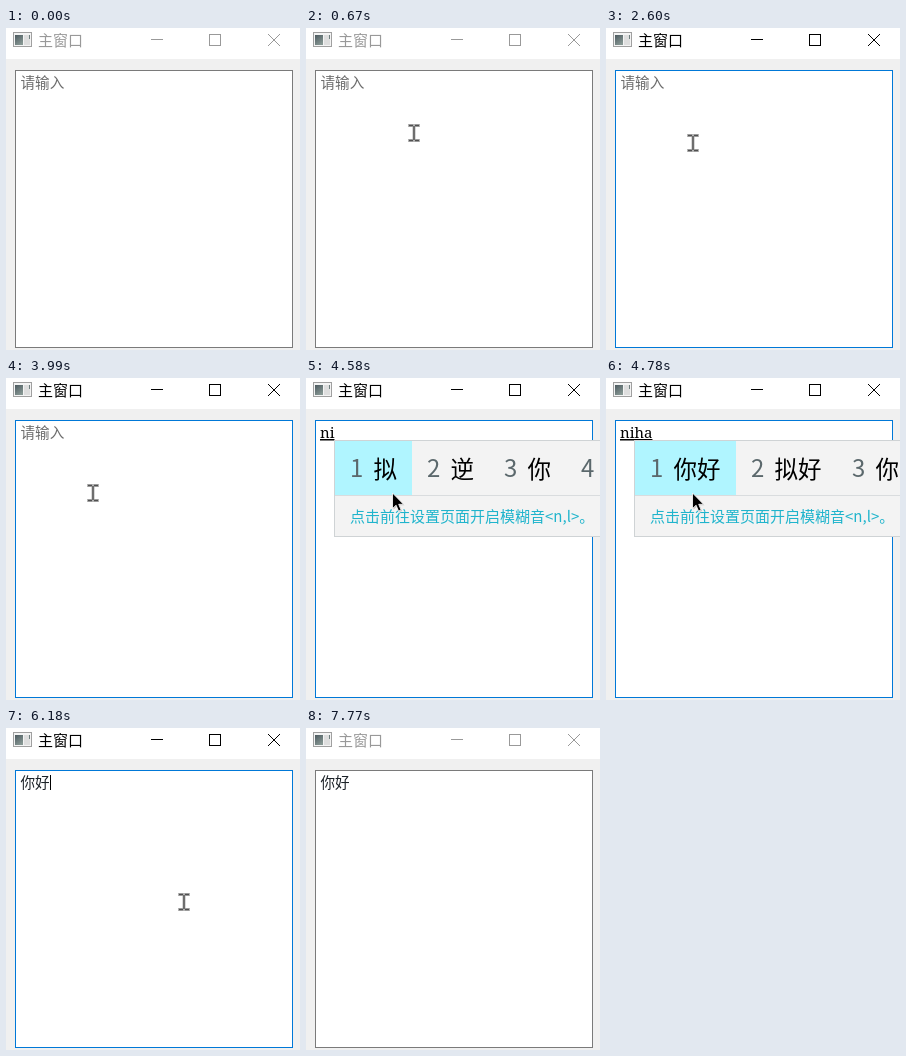
An HTML page for the animation above (7840 ms loop, 294 by 322 pixels).

```html
<!DOCTYPE html>
<html lang="zh-CN">
<head>
<meta charset="utf-8">
<title>主窗口</title>
<style>
  html, body { margin: 0; width: 100%; height: 100%; overflow: hidden; background: #f0f0f0; }
  svg { display: block; width: 294px; height: 322px; }
  text { font-family: "Noto Sans CJK SC", "Noto Sans CJK", sans-serif; font-size: 15px; white-space: pre; }
  .edit { font-size: 14.6px; font-weight: 300; }
  .preedit { font-family: "Noto Serif", serif; text-decoration: underline; }
  .digit { font-size: 24px; fill: #5b686c; }
  .cand { font-size: 23.5px; }
  .hint { fill: #1fb4cc; }
  .crisp { fill: none; shape-rendering: crispEdges; }
</style>
</head>
<body>
<svg viewBox="0 0 294 322">
  <defs>
    <linearGradient id="iconFill" x2="0.6" y2="1">
      <stop offset="0" stop-color="#4c5a60"/>
      <stop offset="1" stop-color="#869692"/>
    </linearGradient>
  </defs>
  <rect width="294" height="322" fill="#f0f0f0"/>
  <rect width="294" height="31" fill="#fff"/>

  <g class="crisp">
    <rect x="7.5" y="4.5" width="18" height="14" style="fill:#f4f4f4" stroke="#a0a0a0"/>
    <rect x="9" y="7" width="8" height="10" style="fill:url(#iconFill)"/>
    <rect x="18" y="7" width="6" height="10" style="fill:#dedede"/>
    <path d="M23.5 7v4" stroke="#6f7f80"/>
  </g>

  <text id="title" x="32" y="18">主窗口</text>
  <g id="buttons" class="crisp">
    <path d="M145 11.5h12M203.5 6.5h11v11h-11z"/>
    <path d="M262 6l12 12M274 6l-12 12"/>
  </g>

  <rect id="box" class="crisp" x="9.5" y="42.5" width="277" height="277" style="fill:#fff"/>
  <text id="edit" class="edit" x="14.5" y="60"></text>
  <text id="preedit" class="preedit" x="14" y="60"></text>
  <rect id="caret" y="47" width="1" height="15"/>

  <g id="popup">
    <rect class="crisp" x="28.5" y="62.5" width="280" height="96" style="fill:#f3f3f3" stroke="#cfd3d5"/>
    <path class="crisp" d="M29 117.5H294" stroke="#d9dcde"/>
    <rect id="highlight" x="29" y="63" height="54" fill="#b0f5ff"/>
    <g id="cands"></g>
    <text class="hint" x="44" y="144">点击前往设置页面开启模糊音&lt;n,l&gt;。</text>
  </g>

  <g id="beam" fill="none">
    <path d="M-6 -7.5H6M-6 7.5H6M0 -8V8" stroke="#b4b4b4" stroke-width="3"/>
    <path d="M-5 -7.5H-1M1 -7.5H5M-5 7.5H-1M1 7.5H5M0 -7V7" stroke="#505050" stroke-width="1.4"/>
  </g>
  <g id="arrow">
    <path d="M1 1V16.5L4.600 13.200L7 19L9.600 18L7.200 12.300H12Z" fill="#000" opacity=".2"/>
    <path d="M0 0V15.500L3.600 12.200L6 18L8.600 17L6.200 11.300H11Z" stroke="#fff" stroke-width=".8"/>
  </g>
</svg>
<script>
const LOOP = 7840, STEP = 66, BLINK = 530, KEY_GAP = 130;
const FOCUS = 1930, TYPING = 4390, COMMIT = TYPING + 4 * KEY_GAP;
const REBLINK = 5050, LEAVE = 5850, EXIT = 6580, BLUR = 7770;
const PINYIN = 'nihao';

const $ = id => document.getElementById(id);
const show = (id, on) => $(id).setAttribute('visibility', on ? 'visible' : 'hidden');

// Each mouse move is a quadratic curve: from, bend, to
const moves = [
  { start: 70, end: 740, path: [[249, 308], [160, 240], [92, 67]] },
  { start: 1000, end: 1600, path: [[92, 67], [104, 38], [86, 53]] },
  { start: FOCUS, end: 2600, path: [[86, 53], [86, 115], [87, 115]] },
  { start: LEAVE, end: EXIT, path: [[87, 115], [199, 154], [263, 311]] }
];

function mouseAt(t) {
  const move = moves.filter(m => m.start <= t).pop();
  if (!move || t >= EXIT) return null;
  const held = t < move.end ? Math.floor((t - move.start) / STEP) * STEP : move.end - move.start;
  const p = held / (move.end - move.start), q = 1 - p;
  const [from, bend, to] = move.path;
  return from.map((v, k) => Math.round(q * q * v + 2 * p * q * bend[k] + p * p * to[k]));
}

function caretOn(t) {
  const since = t < REBLINK ? FOCUS : REBLINK;
  return t >= FOCUS && t < BLUR && Math.floor((t - since) / BLINK) % 2 === 0;
}

let shownWords = '';
function layoutCandidates(words) {
  if (words === shownWords) return;
  shownWords = words;
  let x = 29, html = '';
  words.split(' ').forEach((word, i) => {
    const width = 53 + 24 * word.length;
    html += `<text class="digit" x="${x + 15}" y="99">${i + 1}</text>` +
            `<text class="cand" x="${x + 38.5}" y="100">${word}</text>`;
    if (i === 0) $('highlight').setAttribute('width', width);
    x += width;
  });
  $('cands').innerHTML = html;
}

function draw(t) {
  const active = t >= FOCUS && t < BLUR;
  const composing = t >= TYPING && t < COMMIT;
  const committed = t >= COMMIT;
  const chrome = active ? '#000' : '#999';
  $('title').setAttribute('fill', chrome);
  $('buttons').setAttribute('stroke', chrome);
  $('box').setAttribute('stroke', active ? '#0078d7' : '#7a7a7a');

  const preedit = composing ? PINYIN.slice(0, 1 + Math.floor((t - TYPING) / KEY_GAP)) : '';
  $('preedit').textContent = preedit;
  $('edit').textContent = committed ? '你好' : composing ? '' : '请输入';
  $('edit').setAttribute('fill', committed ? '#1c2228' : '#6c6c6c');

  $('caret').setAttribute('x', committed ? 44 : 14 + 8 * preedit.length);
  show('caret', caretOn(t));

  show('popup', composing);
  layoutCandidates(preedit.length > 2 ? '你好 拟好 你号' : '拟 逆 你 呢');

  const mouse = mouseAt(t);
  const isArrow = t >= TYPING && t < LEAVE;
  show('beam', mouse && !isArrow);
  show('arrow', mouse && isArrow);
  if (mouse) {
    const [x, y] = mouse;
    $('beam').setAttribute('transform', `translate(${x} ${y})`);
    $('arrow').setAttribute('transform', `translate(${x - 0.5} ${y})`);
  }
}

const begin = performance.now();
function tick() {
  draw((performance.now() - begin) % LOOP);
  requestAnimationFrame(tick);
}
draw(0);
requestAnimationFrame(tick);
</script>
</body>
</html>
```
